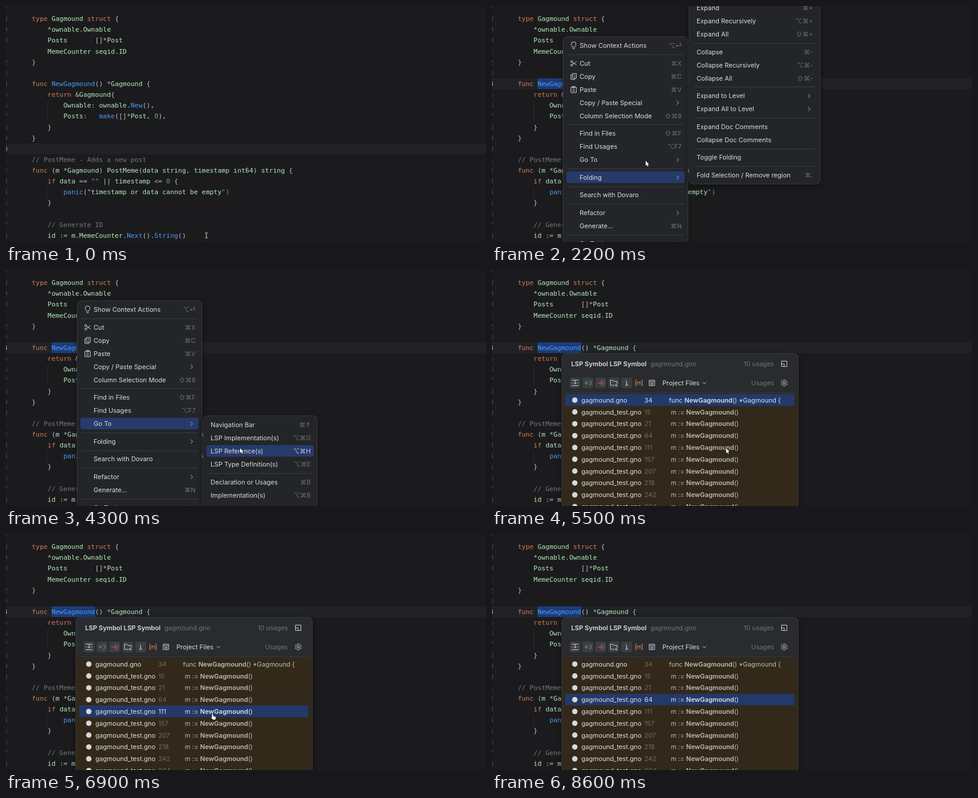
Recreate the animation shown at these times as an HTML page with a canvas. Size 800 by 395 pixels, loop 8700 ms.

```html
<!DOCTYPE html>
<html lang="en">
<head>
<meta charset="utf-8">
<style>
html, body { margin: 0; width: 100%; height: 100%; overflow: hidden; background: #1b1b1d; }
canvas { display: block; }
</style>
</head>
<body>
<canvas id="stage" width="800" height="395"></canvas>
<script>
const ctx = document.getElementById('stage').getContext('2d');
const LOOP = 8700, STEP = 100;
const CHAR = 6.59, LEFT = 43, TOP = 21.3, PITCH = 18.13;
const MONO = '10.95px "DejaVu Sans Mono", monospace';
const UI = '10.7px Inter, sans-serif';
const UI_BOLD = '600 10.7px Inter, sans-serif';

const CODE = `type Gagmound struct {
    *ownable.Ownable
    Posts       []*Post
    MemeCounter seqid.ID
}

func NewGagmound() *Gagmound {
    return &Gagmound{
        Ownable: ownable.New(),
        Posts:   make([]*Post, 0),
    }
}

// PostMeme - Adds a new post
func (m *Gagmound) PostMeme(data string, timestamp int64) string {
    if data == "" || timestamp <= 0 {
        panic("timestamp or data cannot be empty")
    }

    // Generate ID
    id := m.MemeCounter.Next().String()`.split('\n');

const TOKEN = /\/\/.*|"[^"]*"|[A-Za-z]\w*|\d+|[^\s\w]+/g;
const KEYWORDS = /^(type|struct|func|return|if)$/;
const CALLS = /^(NewGagmound|New|make|panic|Next|String)$/;

function tokenColor(s) {
  if (s.startsWith('//')) return '#74767b';
  if (s[0] === '"') return '#60a869';
  if (/^\d/.test(s)) return '#6aa873';
  if (KEYWORDS.test(s)) return '#d07d55';
  if (CALLS.test(s)) return '#4f9af0';
  return /^\w/.test(s) ? '#b4eaba' : '#bcbec4';
}

// Menu rows: [label, shortcut]; '>' opens a submenu, null is a separator
const MAIN = {
  x: 118, y: 51, w: 209, h: 400, first: 66, textX: 146, keyX: 316,
  items: [['Show Context Actions', '⌥⏎'], null, ['Cut', '⌘X'], ['Copy', '⌘C'], ['Paste', '⌘V'],
    ['Copy / Paste Special', '>'], ['Column Selection Mode', '⇧⌘8'], null,
    ['Find in Files', '⇧⌘F'], ['Find Usages', '⌥F7'], ['Go To', '>'], null,
    ['Folding', '>'], null, ['Search with Dovaro', ''], null,
    ['Refactor', '>'], ['Generate...', '⌘N'], null, ['Go Tools', '>']]
};
const FOLDING = {
  x: 328, y: -20, w: 219, h: 318.5, first: 3, textX: 341, keyX: 535,
  items: [['Expand', '⌘+'], ['Expand Recursively', '⌥⌘+'], ['Expand All', '⇧⌘+'], null,
    ['Collapse', '⌘-'], ['Collapse Recursively', '⌥⌘-'], ['Collapse All', '⇧⌘-'], null,
    ['Expand to Level', '>'], ['Expand All to Level', '>'], null,
    ['Expand Doc Comments', ''], ['Collapse Doc Comments', ''], null,
    ['Toggle Folding', ''], null, ['Fold Selection / Remove region', '⌘.']]
};
const GO_TO = {
  x: 328, y: 243.5, w: 191, h: 300, first: 259, textX: 341, keyX: 508,
  items: [['Navigation Bar', '⌘↑'], ['LSP Implementation(s)', '⌥⌘G'], ['LSP Reference(s)', '⌥⌘H'],
    ['LSP Type Definition(s)', '⌥⌘E'], null, ['Declaration or Usages', '⌘B'],
    ['Implementation(s)', '⌥⌘B'], ['Type Declaration', '⇧⌘B']]
};
const USAGES = [34, 15, 21, 64, 111, 157, 207, 218, 242, 264];

// Pointer path: time, x, y
const PATH = [[0, 334, 384], [200, 330, 380], [900, 122, 134], [1200, 118, 130], [1400, 124, 140],
  [2050, 232, 287], [2200, 256, 259], [3000, 262, 256], [3400, 300, 256], [3700, 345, 260],
  [4300, 390, 298], [5800, 390, 298], [6500, 302, 252], [7300, 386, 352], [7600, 388, 350],
  [8200, 420, 276], [8450, 640, 274]];

function pointerAt(t) {
  const i = PATH.findIndex(p => p[0] > t);
  if (i < 0) return { x: 640, y: 274 };
  const [t0, x0, y0] = PATH[i - 1], [t1, x1, y1] = PATH[i];
  const u = (t - t0) / (t1 - t0), e = u * u * (3 - 2 * u);
  return { x: x0 + (x1 - x0) * e, y: y0 + (y1 - y0) * e };
}

function text(s, x, y, color, font = UI, align = 'left') {
  ctx.font = font;
  ctx.fillStyle = color;
  ctx.textAlign = align;
  ctx.fillText(s, x, y + 3.9);
  return ctx.measureText(s).width;
}

function rect(x, y, w, h, color) {
  ctx.fillStyle = color;
  ctx.fillRect(x, y, w, h);
}

function box(x, y, w, h, r, fill, stroke) {
  ctx.beginPath();
  ctx.roundRect(x, y, w, h, r);
  if (fill) { ctx.fillStyle = fill; ctx.fill(); }
  if (stroke) { ctx.strokeStyle = stroke; ctx.lineWidth = 1; ctx.stroke(); }
}

function line(x, y, path, color, width = 1) {
  ctx.save();
  ctx.translate(x, y);
  ctx.strokeStyle = color;
  ctx.lineWidth = width;
  ctx.stroke(new Path2D(path));
  ctx.restore();
}

function shadowBox(x, y, w, h, fill) {
  ctx.save();
  ctx.shadowColor = 'rgba(0,0,0,.4)';
  ctx.shadowBlur = 10;
  ctx.shadowOffsetY = 3;
  box(x, y, w, h, 7, fill);
  ctx.restore();
  box(x + .5, y + .5, w - 1, h - 1, 7, null, '#37393d');
}

function drawEditor(activeRow, selected) {
  rect(0, 0, 800, 395, '#1b1b1d');
  rect(0, TOP + activeRow * PITCH - 9, 800, 18, '#212227');
  const guide = (x, from, to) =>
    rect(x, TOP + from * PITCH - 9, 1, (to - from + 1) * PITCH, '#2a2b2e');
  guide(69, 8, 9);
  guide(69, 16, 16);
  if (selected) rect(76, 121, 72.5, 18, '#1c3b78');
  CODE.forEach((src, row) => {
    const y = TOP + row * PITCH;
    text((28 + row) % 10, 2.6, y, row === activeRow ? '#a1a3ab' : '#4b5059', MONO, 'right');
    for (const m of src.matchAll(TOKEN))
      text(m[0], LEFT + m.index * CHAR, y, tokenColor(m[0]), MONO);
  });
  text('7', 2.6, TOP - PITCH, '#4b5059', MONO, 'right');
}

function menuRows(menu) {
  let y = menu.first;
  return menu.items.map(item => {
    if (!item) {
      y += 7.6;
      return { y: y - 14.8 };
    }
    const row = { y, label: item[0], key: item[1] };
    y += 22;
    return row;
  });
}

function hoveredLabel(menu, p) {
  if (p.x < menu.x + 4 || p.x > menu.x + menu.w) return '';
  const hit = menuRows(menu).find(r => r.label && Math.abs(r.y - p.y) < 11);
  return hit ? hit.label : '';
}

function drawMenu(menu, active) {
  shadowBox(menu.x, menu.y, menu.w, menu.h, '#232528');
  for (const { y, label, key } of menuRows(menu)) {
    if (!label) {
      rect(menu.x + 8, Math.round(y), menu.w - 16, 1, '#393b3f');
      continue;
    }
    const on = label === active;
    if (on) box(menu.x + 6, y - 10, menu.w - 12, 19.5, 4, '#263b6b');
    text(label, menu.textX, y, '#dadce0');
    if (key === '>') line(menu.keyX - 8, y, 'M0-3l3 3.3l-3 3.3', '#b4b6bb');
    else text(key, menu.keyX, y, on ? '#c0c6d4' : '#6d7076', UI, 'right');
  }
}

function drawMenuIcons() {
  const c = '#c5c7cc';
  line(136, 66, 'M-2 3C-2 1-4 0-4-2A4 4 0 0 1 4-2C4 0 2 1 2 3ZM-2 5.5H2', c);
  line(136, 96, 'M-2-2L5 3M-2 2L5-3M-1.5-3a1.7 1.7 0 1 1-3.4 0a1.7 1.7 0 1 1 3.4 0M-1.5 3a1.7 1.7 0 1 1-3.4 0a1.7 1.7 0 1 1 3.4 0', c);
  line(136, 118, 'M-2-5H4.5V3H-2ZM-2-3H-4.5V5H2V3M0-2.5H2.5M0 .5H2.5', c);
  line(136, 140, 'M-4.5-4H4.5V5H-4.5ZM-2-5.5H2V-3H-2ZM-2 0H2M-2 2.5H2', c);
}

function drawGear(x, y, color) {
  ctx.beginPath();
  for (let i = 0; i <= 96; i++) {
    const a = i / 96 * Math.PI * 2, r = 4.6 + .7 * Math.tanh(3 * Math.cos(6 * a));
    ctx.lineTo(x + r * Math.sin(a), y + r * Math.cos(a));
  }
  ctx.moveTo(x + 1.8, y);
  ctx.arc(x, y, 1.8, 0, Math.PI * 2);
  ctx.strokeStyle = color;
  ctx.lineWidth = 1;
  ctx.stroke();
}

function drawToolbar() {
  const c = '#c9cbd0', y = 189;
  for (const x of [138.5, 160, 181, 203, 224.5]) box(x - 9, y - 9, 18, 18, 3, '#3b3d41');
  line(138.5, y, 'M-5.5-4.5H5.5M-5.5 4.5H5.5M0-4V2M-2.5-.5L0 2L2.5-.5M-5.5 0H-4M4 0H5.5', c);
  line(160, y, 'M-5 0H1M-2-3L-5 0L-2 3M1.5-4A4 4 0 0 1 1.5 4', '#5fa968');
  line(181, y, 'M-5 0H3M0-3L3 0L0 3M1.5-4.5A4.5 4.5 0 0 1 1.5 4.5', '#d0655f');
  line(203, y, 'M1 4H-5.5V-4.5H-1.5L0-2.5H5.5V1M4 1.5V6M1.8 3.8H6.2', c);
  line(224.5, y, 'M-2-1H0V4M-2.5 4H2.5M-.5-4.5V-3', c, 1.2);
  line(245, y, 'M-3.5-4.5H-5.5V4.5H-3.5M3.5-4.5H5.5V4.5H3.5M-3 3V-1.5H3V3M0-1.5V3', '#cf8357');
  line(266.5, y, 'M-4.5-4.5H4.5V4.5H-4.5ZM-4.5-2H4.5M-2.5 .5H2.5M-2.5 2.5H2.5', c);
  text('Project Files', 284, y, '#dcdee2');
  line(354, y, 'M-3-1.5L0 1.5L3-1.5', c);
  text('Usages', 470, y, '#717479', UI, 'right');
  drawGear(487, y, c);
}

function drawUsages(active) {
  shadowBox(116, 139, 395, 300, '#292b2e');
  text('LSP Symbol LSP Symbol', 132, 157, '#dcdee2', UI_BOLD);
  text('gagmound.gno', 264, 157, '#717479');
  text('10 usages', 470, 157, '#717479', UI, 'right');
  line(487, 157, 'M-4.5-4.5H4.5V4.5H-4.5ZM-4.5 0H0V4.5', '#c9cbd0');
  drawToolbar();
  rect(122, 205, 382, 1, '#34363a');
  rect(117, 207, 393, 188, '#32291b');
  USAGES.forEach((number, i) => {
    const y = 217.8 + i * 19.8, on = i === active;
    if (on) box(122, y - 10, 382, 19.6, 3, '#233969');
    ctx.beginPath();
    ctx.arc(138, y, 4.5, 0, 7);
    ctx.fillStyle = '#d8d8d8';
    ctx.fill();
    text(i ? 'gagmound_test.gno' : 'gagmound.gno', 149, y, '#e0e0e0');
    text(number, 254, y, on ? '#dde0e8' : '#746c60');
    const code = on ? '#dde0e8' : '#bebab3';
    let x = i ? 298 : 295;
    x += text(i ? 'm := ' : 'func ', x, y, code);
    x += text('NewGagmound', x, y, code, UI_BOLD);
    text(i ? '()' : '() *Gagmound {', x, y, code);
  });
}

function drawPointer({ x, y }, kind) {
  if (kind === 'beam') {
    line(x, y, 'M-2-4.5Q0-4.5 0-3Q0-4.5 2-4.5M0-3V3M-2 4.5Q0 4.5 0 3Q0 4.5 2 4.5', '#d8d8d8');
    return;
  }
  const shape = new Path2D(kind === 'hand'
    ? 'M-1 0Q0-1.2 1 0L1.8 3L4.5 3.5Q6 3.9 5.7 5.6L5.2 8.8H1L-2.3 5.3Q-2.3 4-.6 4.8Z'
    : 'M0 0V8.4L1.9 6.7L3.3 9.8L4.8 9.1L3.5 6.1H6Z');
  ctx.save();
  ctx.translate(x, y);
  ctx.lineJoin = 'round';
  ctx.lineWidth = 1.4;
  ctx.strokeStyle = '#111';
  ctx.fillStyle = '#f2f2f2';
  ctx.stroke(shape);
  ctx.fill(shape);
  ctx.restore();
}

function draw(t) {
  const p = pointerAt(t);
  const selected = t >= 1100;
  drawEditor(selected ? 6 : 12, selected);
  if (t >= 1300 && t < 4900) {
    const sub = t < 2200 ? null : t < 3100 ? FOLDING : GO_TO;
    drawMenu(MAIN, !sub ? hoveredLabel(MAIN, p) : sub === FOLDING ? 'Folding' : 'Go To');
    drawMenuIcons();
    if (sub) drawMenu(sub, hoveredLabel(sub, p));
  }
  if (t >= 5100) drawUsages(t < 5900 ? 0 : Math.round((p.y - 217.8) / 19.8));
  if (t < 8500) drawPointer(p, t < 1300 ? 'beam' : t >= 5900 && p.x < 511 ? 'hand' : 'arrow');
}

const start = performance.now();
function frame() {
  const t = (performance.now() - start) % LOOP;
  draw(Math.floor(t / STEP) * STEP);
  requestAnimationFrame(frame);
}
frame();
</script>
</body>
</html>
```
